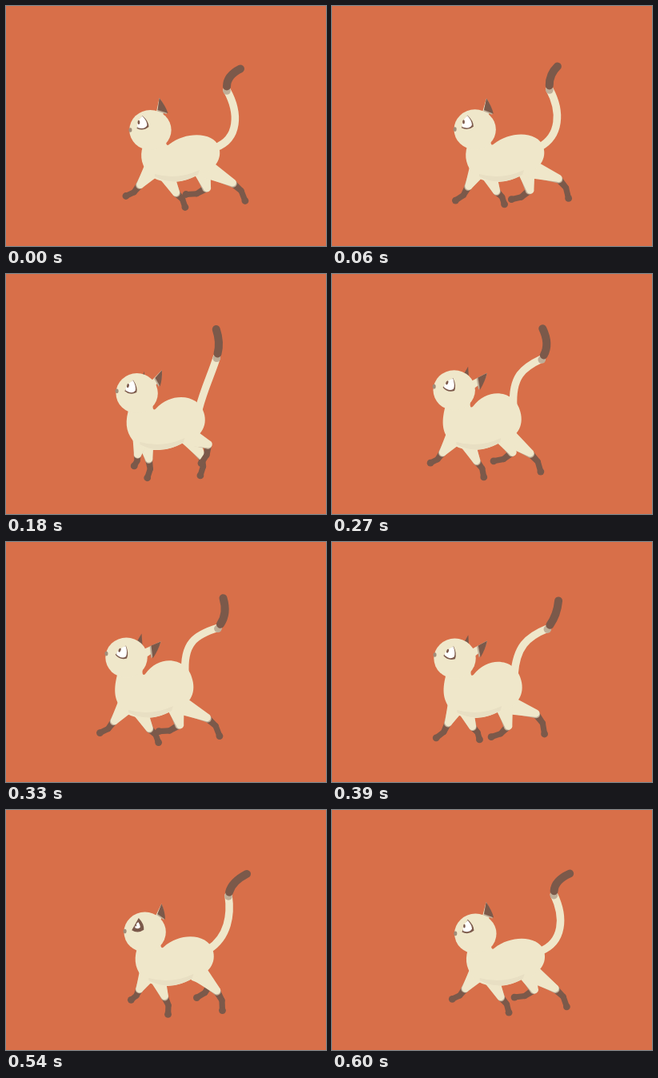
These frames come from a looping animation (400 px wide and 300 px high, 630 ms). An HTML page with a canvas:

```html
<!DOCTYPE html>
<html lang="en">
<head>
<meta charset="utf-8">
<title>Walking cat</title>
<style>
  html, body { margin: 0; width: 100%; height: 100%; overflow: hidden; background: #d86f49; }
  canvas { display: block; width: 400px; height: 300px; }
</style>
</head>
<body>
<canvas id="stage" width="400" height="300"></canvas>
<script>
const ctx = document.getElementById('stage').getContext('2d');
const LOOP = 630, STEP = 30, TURN = 2 * Math.PI;
const BG = '#d86f49', CREAM = '#efe7ca', SHADE = '#e8dfc3', BROWN = '#7b594a', TAN = '#bfae98';

const mix = (a, b, k) => a + (b - a) * k;

// Periodic swing around a mean; the last term adds the second harmonic.
const wave = (p, mean, cos, sin = 0, cos2 = 0) =>
  mean + cos * Math.cos(p) + sin * Math.sin(p) + cos2 * Math.cos(2 * p);

function fill(color, draw) {
  ctx.beginPath();
  draw();
  ctx.fillStyle = color;
  ctx.fill();
}

function line(color, width, draw) {
  ctx.beginPath();
  draw();
  ctx.strokeStyle = color;
  ctx.lineWidth = width;
  ctx.stroke();
}

const oval = (color, x, y, rx, ry = rx) =>
  fill(color, () => ctx.ellipse(x, y, rx, ry, 0, 0, TURN));

// Two discs joined by straight sides.
function taper(color, x1, y1, r1, x2, y2, r2) {
  const a = Math.atan2(y2 - y1, x2 - x1), h = Math.PI / 2;
  fill(color, () => {
    ctx.arc(x1, y1, r1, a + h, a - h);
    ctx.arc(x2, y2, r2, a - h, a + h);
  });
}

function leg(hipX, hipY, kneeX, kneeY, footX, footY) {
  const dx = footX - kneeX, dy = footY - kneeY;
  const midX = kneeX + dx / 2 + dy * .12, midY = kneeY + dy / 2 - dx * .12;
  taper(BROWN, kneeX, kneeY, 4.5, midX, midY, 3.6);
  taper(BROWN, midX, midY, 3.6, footX, footY, 3.6);
  oval(BROWN, footX, footY, 4.4);
  taper(TAN, hipX, hipY, 10, kneeX, kneeY, 4.8);
  taper(CREAM, hipX, hipY, 11.5, kneeX - dx * .06, kneeY - dy * .06, 4.8);
}

function frontLeg(p) {
  const kneeX = wave(p, 190, -23, 2);
  leg(mix(190, kneeX, .3), 204, kneeX, wave(p, 229, -5, 2),
    wave(p, 187, -37), wave(p, 246, -7, 6, -1.5));
}

function hindLeg(p) {
  const kneeX = wave(p, 267, -17, -8);
  leg(248 + (kneeX - 267) * .2, 204, kneeX, wave(p, 223, 3, 8, 2),
    wave(p, 262, -37, -9), wave(p, 242, -4, 7, -2.5));
}

function tail(p, k) {
  const jointX = wave(p, 270, 6, -5.5), jointY = wave(p, 106, -1, -2);
  const bendX = wave(p, 276, 0, -8), bendY = wave(p, 88, -1, -3);
  line(CREAM, 9.5, () => {
    ctx.moveTo(mix(262, 224, k), mix(177, 165, k));
    ctx.bezierCurveTo(wave(p, 256, 35), wave(p, 146, 20),
      wave(p, 264, 28), wave(p, 125, 9), jointX, jointY);
  });
  oval(TAN, jointX, jointY + 1, 4.8);
  line(BROWN, 10, () => {
    ctx.moveTo(mix(jointX, bendX, .25), mix(jointY, bendY, .25));
    ctx.quadraticCurveTo(bendX, bendY, wave(p, 281, 12, -16), wave(p, 74, 4.5, -4));
  });
}

// The belly stays level while the back arches up.
function body(k) {
  fill(CREAM, () => {
    ctx.moveTo(173, 170 - 8 * k);
    ctx.bezierCurveTo(167, 184, 168, 196, 177, 208);
    ctx.bezierCurveTo(187, 222, 215, 225, 240, 211);
    ctx.bezierCurveTo(262, 206, 271, 190, 266, 176 - 4 * k);
    ctx.bezierCurveTo(260, 158 - 13 * k, 226, 156 - 17 * k, 204 + 3 * k, 173 - 8 * k);
    ctx.bezierCurveTo(201 + 3 * k, 176 - 8 * k, 199 + 3 * k, 172 - 8 * k, 201 + 4 * k, 164 - 9 * k);
  });
  fill(SHADE, () => {
    ctx.moveTo(186, 210);
    ctx.quadraticCurveTo(214, 218, 242, 205);
    ctx.lineTo(240, 211);
    ctx.quadraticCurveTo(212, 227, 186, 213);
  });
}

function eye(k, open) {
  ctx.save();
  ctx.translate(mix(-10, -5, k), mix(-8, -6, k));
  ctx.rotate(.45 * k);
  fill(BROWN, () => {
    ctx.moveTo(0, -10);
    ctx.quadraticCurveTo(8, -3, 8, 4);
    ctx.quadraticCurveTo(1, 10, -7, 6);
  });
  ctx.scale(open, open);
  fill('#fff', () => {
    ctx.moveTo(0, -9.5);
    ctx.quadraticCurveTo(6, -3, 6, 2);
    ctx.quadraticCurveTo(3, 8, -6, 5);
    ctx.quadraticCurveTo(-8, -1, 0, -9.5);
  });
  oval(BROWN, -4.5, -1.5, 1.4, 2.6);
  ctx.restore();
}

function farEar(k) {
  fill(BROWN, () => {
    ctx.moveTo(22 * k - 3, -24 - 6 * k);
    ctx.lineTo(16 * k - 4, -18);
    ctx.lineTo(24 * k - 4, -16);
  });
}

function nearEar(k) {
  const turn = k ** .8;
  const tipX = 11 + 32 * turn, tipY = -40 + 20 * k;
  const topX = 9 + 22 * turn, topY = -25 + 10 * k;
  const lowX = 22 + 11 * turn, lowY = -21 + 22 * k;
  const shape = (color, grow) => fill(color, () => {
    ctx.moveTo(tipX, tipY);
    ctx.lineTo(topX * grow, topY * grow);
    ctx.lineTo(lowX * grow, lowY * grow);
    ctx.quadraticCurveTo(mix(tipX, lowX, .5) + 2, mix(tipY, lowY, .5), tipX, tipY);
  });
  shape(CREAM, .7);
  shape(TAN, .94);
  shape(BROWN, 1);
}

function head(t, k) {
  ctx.save();
  ctx.translate(180.5 - 30 * k, 155 - 10.5 * k);
  farEar(k);
  oval(CREAM, 0, 0, 26.2, 25);
  nearEar(k);
  oval('#a18c79', -25, -5 * k, 2, 2.8);
  eye(k, 1 - .58 * Math.exp(-(((t - 510) / 65) ** 2)));
  ctx.restore();
}

function draw(t) {
  const phase = TURN * t / LOOP;
  const k = (1 - Math.cos(phase - .1)) / 2;
  ctx.fillStyle = BG;
  ctx.fillRect(0, 0, 400, 300);
  ctx.lineCap = 'round';

  tail(phase, k);
  ctx.save();
  ctx.translate(-33 * k, 0);
  for (const p of [phase, phase + Math.PI]) {
    hindLeg(p);
    frontLeg(p);
  }
  body(k);
  ctx.restore();
  head(t, k);
}

const start = performance.now();
function tick() {
  const elapsed = performance.now() - start;
  draw(Math.floor(elapsed / STEP) * STEP % LOOP);
  requestAnimationFrame(tick);
}
tick();
</script>
</body>
</html>
```
